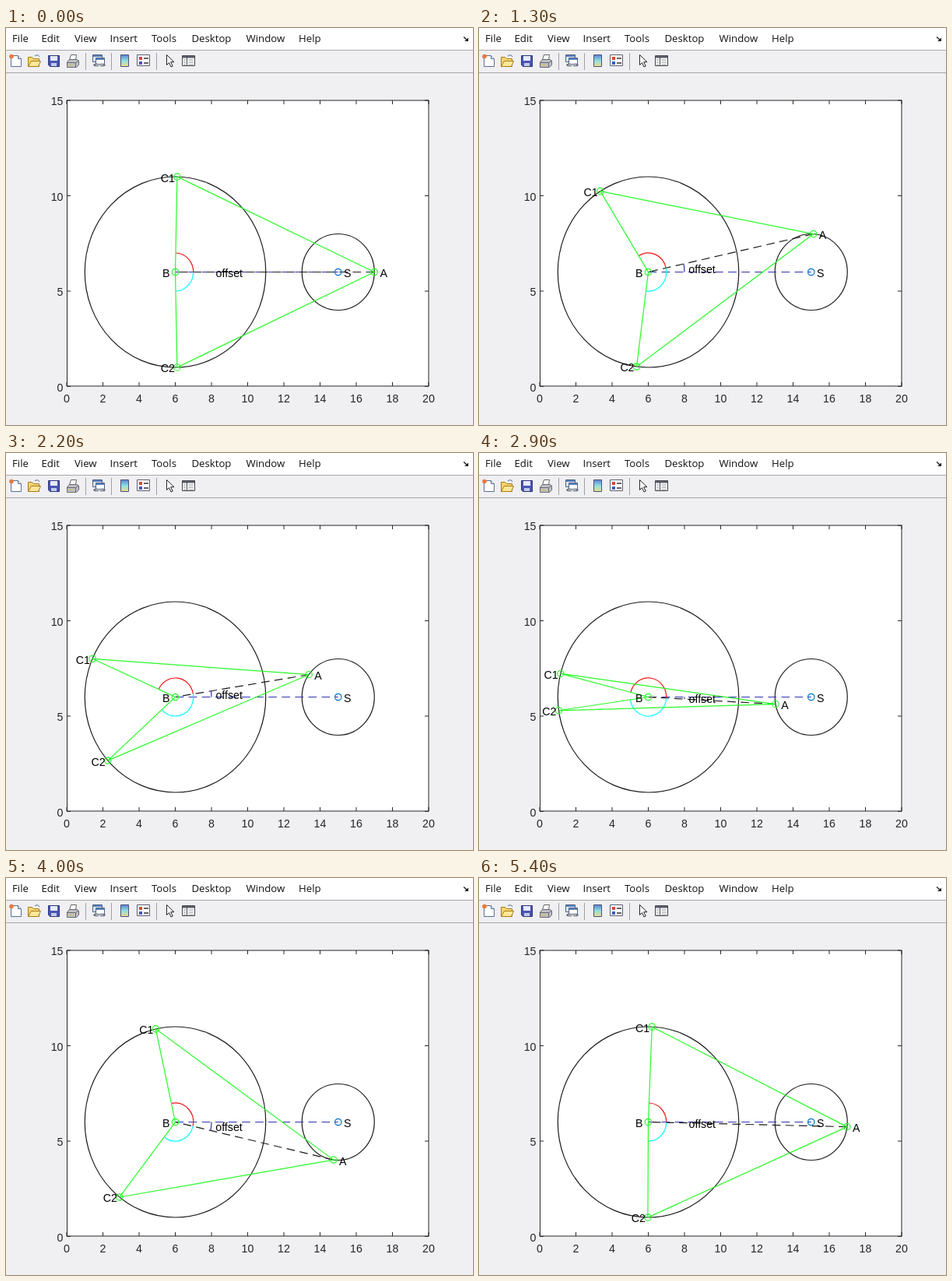
Write an HTML page that moves like this. It is 600 px wide and 510 px high and loops after 5500 ms.

```html
<!DOCTYPE html>
<html lang="en">
<head>
<meta charset="utf-8">
<title>Crank geometry</title>
<style>
  html, body { margin: 0; width: 100%; height: 100%; overflow: hidden; background: #f0eff1; }
  svg { display: block; }
  .menu { font: 13.2px "Open Sans", "Noto Sans", sans-serif; fill: #111; }
  .plot { font: 14.2px "Liberation Sans", Arial, sans-serif; }
  .ticks text { fill: #262626; }
  .lines { fill: none; stroke-width: 1.2; }
  .dash { stroke-dasharray: 10.7 6.4; }
</style>
</head>
<body>
<svg width="600" height="510" viewBox="0 0 600 510">
  <rect width="600" height="510" fill="#f0eff1"/>
  <rect width="600" height="28" fill="#fff"/>
  <path d="M0 28.5H600M0 57.5H600" stroke="#a6a6a8"/>
  <g class="menu" id="menu"></g>
  <path d="M588 11.500l4 3.500" stroke="#222" stroke-width="1.400"/>
  <path d="M594 12.500v4.500h-5z" fill="#222"/>

  <g id="toolbar" stroke-linejoin="round">
    <path d="M102.500 32V54M135.500 32V54M193.500 32V54" stroke="#a0a0a2"/>
    <g id="new">
      <path d="M6.500 35.500h9l4 4v10h-13z" fill="#fff" stroke="#5a6f96"/>
      <path d="M15.500 35.500v4h4" fill="#dbe6f5" stroke="#5a6f96"/>
      <circle cx="7" cy="36.500" r="2.800" fill="#e8793a"/>
    </g>
    <g id="open" stroke="#a87a1e">
      <path d="M28.500 49.500v-12h5l2 2h7v10z" fill="#f5d56c"/>
      <path d="M28.500 49.500l4-7h12l-3 7z" fill="#ffe898"/>
      <path d="M37 36q4-3 6 1" fill="none" stroke="#49699e"/>
    </g>
    <g id="save">
      <path d="M54.500 35.500h14v14h-12l-2-2z" fill="#4a55b4" stroke="#2d347c"/>
      <path d="M57 36h9v6h-9z" fill="#e6ebfa"/>
      <path d="M58 45h7v4h-7z" fill="#c4cae4"/>
    </g>
    <g id="print" stroke="#66676c">
      <path d="M81.500 41l2-6.500h7l-1 6.500z" fill="#fff"/>
      <path d="M78.500 44l3-3.500h10l2 2v5l-3 3h-12z" fill="#c0c1c6"/>
      <path d="M78.500 44.500h11l4-2.500M89.500 45v5" fill="none"/>
      <path d="M80 47.500h6" stroke="#d8b33a"/>
    </g>
    <g id="link">
      <path d="M111.500 34.500h12v9h-12z" fill="#dfe9f6" stroke="#4b6185"/>
      <path d="M112 36h11" stroke="#5b82bd" stroke-width="2"/>
      <path d="M115.500 38.500h11v8h-11z" fill="#fff" stroke="#4b6185"/>
      <path d="M116 40h10" stroke="#5b82bd" stroke-width="2"/>
      <path d="M114 47.500h4m4 0h4" stroke="#6b7282" stroke-width="3.400" stroke-linecap="round"/>
      <path d="M115 47.500h10" stroke="#ddd"/>
    </g>
    <g id="colorbar">
      <rect x="147.500" y="34.500" width="10" height="15" fill="url(#bar)" stroke="#47527a"/>
    </g>
    <g id="legend">
      <path d="M168.500 34.500h16v14h-16z" fill="#fff" stroke="#5c5f74"/>
      <path d="M171 37h4v4h-4z" fill="#d9483b"/>
      <path d="M171 43h4v4h-4z" fill="#4558bd"/>
      <path d="M177 39h6M177 45h6" stroke="#333" stroke-width="1.600"/>
    </g>
    <path d="M206.500 34.500v13l3-3 2.500 5.500 2.200-1-2.500-5.300h4.300z" fill="#fff" stroke="#222"/>
    <g id="inspector">
      <path d="M226.500 35.500h16v13h-16z" fill="#fff" stroke="#41434a"/>
      <path d="M227 37h15" stroke="#595c66" stroke-width="3"/>
      <path d="M232.500 38v10" stroke="#41434a"/>
      <path d="M228 41h3m-3 3h3m-3 3h3M234.500 41h6m-6 3h6m-6 3h6" stroke="#8b8e96"/>
    </g>
  </g>
  <defs>
    <linearGradient id="bar" x2="0" y2="1">
      <stop stop-color="#5d7fd3"/><stop offset=".5" stop-color="#8fe0e0"/><stop offset="1" stop-color="#f0dc82"/>
    </linearGradient>
  </defs>

  <rect x="78.500" y="93" width="464.500" height="367" fill="#fff" stroke="#262626"/>
  <g class="plot ticks" id="ticks"></g>
  <g class="lines" id="lines"></g>
  <g class="plot" id="labels"></g>
</svg>

<script>
const UX = 23.25, UY = 24.5;
const X = x => 78 + x * UX, Y = y => 460.5 - y * UY;
const $ = id => document.getElementById(id);

function add(parent, tag, attrs, text) {
  const el = document.createElementNS("http://www.w3.org/2000/svg", tag);
  set(el, attrs);
  if (text !== undefined) el.textContent = text;
  parent.appendChild(el);
  return el;
}
function set(el, attrs) {
  for (const key in attrs) el.setAttribute(key, attrs[key]);
}

const menu = { File: 8, Edit: 45.5, View: 88, Insert: 133.5, Tools: 187, Desktop: 238.5, Window: 308.5, Help: 376 };
for (const name in menu) add($("menu"), "text", { x: menu[name], y: 18 }, name);

// Axis ticks and numbers
let ticks = "";
for (let v = 0; v <= 20; v += 2) {
  ticks += `M${X(v)} 460v-5M${X(v)} 93v5`;
  add($("ticks"), "text", { x: X(v), y: 481.2, "text-anchor": "middle" }, v);
}
for (let v = 0; v <= 15; v += 5) {
  ticks += `M78 ${Y(v)}h5M543 ${Y(v)}h-5`;
  add($("ticks"), "text", { x: 73.5, y: Y(v) + 6, "text-anchor": "end" }, v);
}
add($("ticks"), "path", { d: ticks, stroke: "#262626" });

// Linkage: B is the hub, S the small wheel's centre, A runs on the small wheel
const B = [6, 6], S = [15, 6], ARM = 5, ROD = 11.99;
const GREEN = "#28fa28", BLUE = "#3030b8", BLACK = "#1c1c1c";
const at = (c, r, a) => [c[0] + r * Math.cos(a), c[1] + r * Math.sin(a)];
const px = p => `${X(p[0]).toFixed(2)} ${Y(p[1]).toFixed(2)}`;
const arc = (r, from, to) =>
  `M${px(at(B, r, from))}A${r * UX} ${r * UY} 0 0 ${to > from ? 0 : 1} ${px(at(B, r, to))}`;

const lines = $("lines");
const line = (stroke, cls = "") => add(lines, "path", { stroke, class: cls });
const mark = (p, stroke) => add(lines, "circle", { cx: X(p[0]), cy: Y(p[1]), r: 4.2, stroke });
for (const [c, r] of [[B, ARM], [S, 2]])
  add(lines, "ellipse", { cx: X(c[0]), cy: Y(c[1]), rx: r * UX, ry: r * UY, stroke: BLACK });

const base = line(BLUE, "dash"), sight = line(BLACK, "dash");
const small = line(BLUE), upper = line("#f01414"), lower = line("#0ff");
const rods = line(GREEN);
set(base, { d: `M${px(B)}L${px(S)}` });
mark(S, "#0072bd");
mark(B, GREEN);
const marks = [S, S, S].map(p => mark(p, GREEN));

const label = text => add($("labels"), "text", {}, text);
const put = (el, p, dx) => set(el, { x: X(p[0]) + dx, y: Y(p[1]) + 6.5 });
put(label("B"), B, -16.5);
put(label("S"), S, 7.2);
const [tA, tC1, tC2, tOff] = ["A", "C1", "C2", "offset"].map(label);

function draw(turn) {
  const A = at(S, 2, turn);
  const dx = A[0] - B[0], dy = A[1] - B[1], d = Math.hypot(dx, dy);
  const off = Math.atan2(dy, dx);
  const half = Math.acos((d * d + ARM * ARM - ROD * ROD) / (2 * d * ARM));
  const C1 = at(B, ARM, off + half), C2 = at(B, ARM, off - half);

  set(sight, { d: `M${px(A)}L${px(B)}` });
  set(rods, { d: `M${px(A)}L${px(C1)}L${px(B)}L${px(C2)}Z` });
  set(small, { d: arc(2, 0, off) });
  set(upper, { d: arc(1, off, off + half) });
  set(lower, { d: arc(1, off, off - half) });
  [A, C1, C2].forEach((p, i) => set(marks[i], { cx: X(p[0]), cy: Y(p[1]) }));
  put(tA, A, 7.2);
  put(tC1, C1, -21.2);
  put(tC2, C2, -21.2);
  put(tOff, at(B, 2, off / 2), 5.6);
}

// 100 positions per turn, shown at ten pictures a second
let shown = -1;
function tick() {
  const i = Math.floor(performance.now() % 5500 / 100);
  if (i !== shown) {
    shown = i;
    draw(Math.floor(i * 20 / 11 + 0.6) * Math.PI / 50);
  }
  requestAnimationFrame(tick);
}
tick();
</script>
</body>
</html>
```
